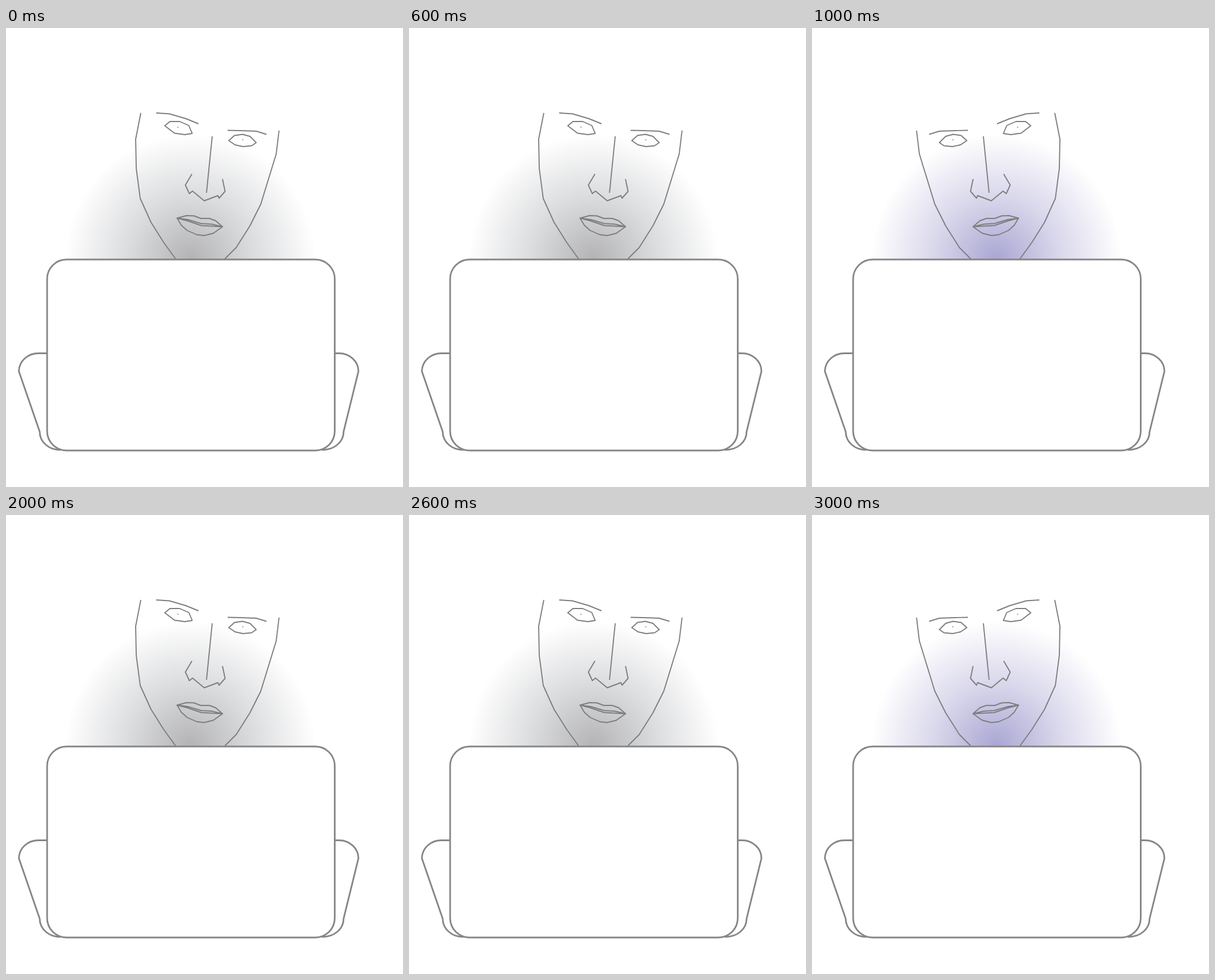
These frames come from a looping animation (695 px wide and 805 px high, 4 s). An HTML page:

```html
<!DOCTYPE html>
<html lang="en">
<head>
<meta charset="utf-8">
<title>Face behind a screen</title>
<style>
html, body { margin: 0; width: 100%; height: 100%; overflow: hidden; background: #fff; }
svg { display: block; width: 695px; height: 805px; }
</style>
</head>
<body>
<svg viewBox="0 0 695 805" fill="none">
  <defs>
    <radialGradient id="gray">
      <stop offset="0" stop-color="#b3b3b5"/>
      <stop offset=".5" stop-color="#dbdcde"/>
      <stop offset="1" stop-color="#fff"/>
    </radialGradient>
    <radialGradient id="violet">
      <stop offset="0" stop-color="#aaa6d3"/>
      <stop offset=".5" stop-color="#d9d7eb"/>
      <stop offset="1" stop-color="#fff"/>
    </radialGradient>
  </defs>
  <circle id="glow" cx="323" cy="405" r="219"/>
  <g id="face" stroke="#7d7d7f" stroke-width="1.9" stroke-linejoin="round">
    <!-- outline -->
    <path d="M236 149L227 195L228 246L235 299L254 341L276 376L297 405"/>
    <path d="M478 180L473 221L446 309L427 347L403 385L383 405"/>
    <!-- brows and eyes -->
    <path d="M263 149L286 150.5L315 159L337 168M388 179.5L411 180L438 181L456 186.5"/>
    <path d="M278 171.5L287 164L304 164L320 171L326 185L313 187L295 184.5Z"/>
    <path d="M390 197.5L400 188.5L414 186.5L427 190L438 201L430 206.5L415 208L401 205Z"/>
    <g fill="#b0b0b0" stroke="none">
      <circle cx="301" cy="174" r="1.3"/>
      <circle cx="414.5" cy="196" r="1.3"/>
    </g>
    <!-- nose -->
    <path d="M361 190L351 289"/>
    <path d="M325.5 256L314 275.5L321 290.5L326.5 286L347 303L371 294L373 298.5L383.5 286.5L379 265"/>
    <!-- mouth -->
    <path d="M299.5 333.5L316 329L329 329.5L341 334L356 334L367 338L379 348.5L363 360L347 364L334 362.5L317 355L307 346Z"/>
    <path d="M299.5 333.5L318 336L342 343L360 344L379 348.5L342 346.5L317 338Z"/>
  </g>
  <g stroke="#868686" stroke-width="2.9">
    <path d="M72 570.5H57C38 570.5 23 584 22.5 602L59 708C59 726 75 740 95 740"/>
    <path d="M575 570.5H583C602 570.5 617 585 617 602L591 708C591 726 575 740 553 740"/>
    <rect x="72" y="406" width="503.5" height="335" rx="34" fill="#fff"/>
  </g>
</svg>
<script>
const HOLD = 1000;
const AXIS_SUM = 661;
const face = document.getElementById("face");
const glow = document.getElementById("glow");

function render(ms) {
  const turned = Math.floor(ms / HOLD) % 2 === 1;
  face.setAttribute("transform", turned ? `translate(${AXIS_SUM} 0) scale(-1 1)` : "");
  glow.setAttribute("fill", turned ? "url(#violet)" : "url(#gray)");
}

const start = performance.now();
function tick() {
  render(performance.now() - start);
  requestAnimationFrame(tick);
}
tick();
</script>
</body>
</html>
```
